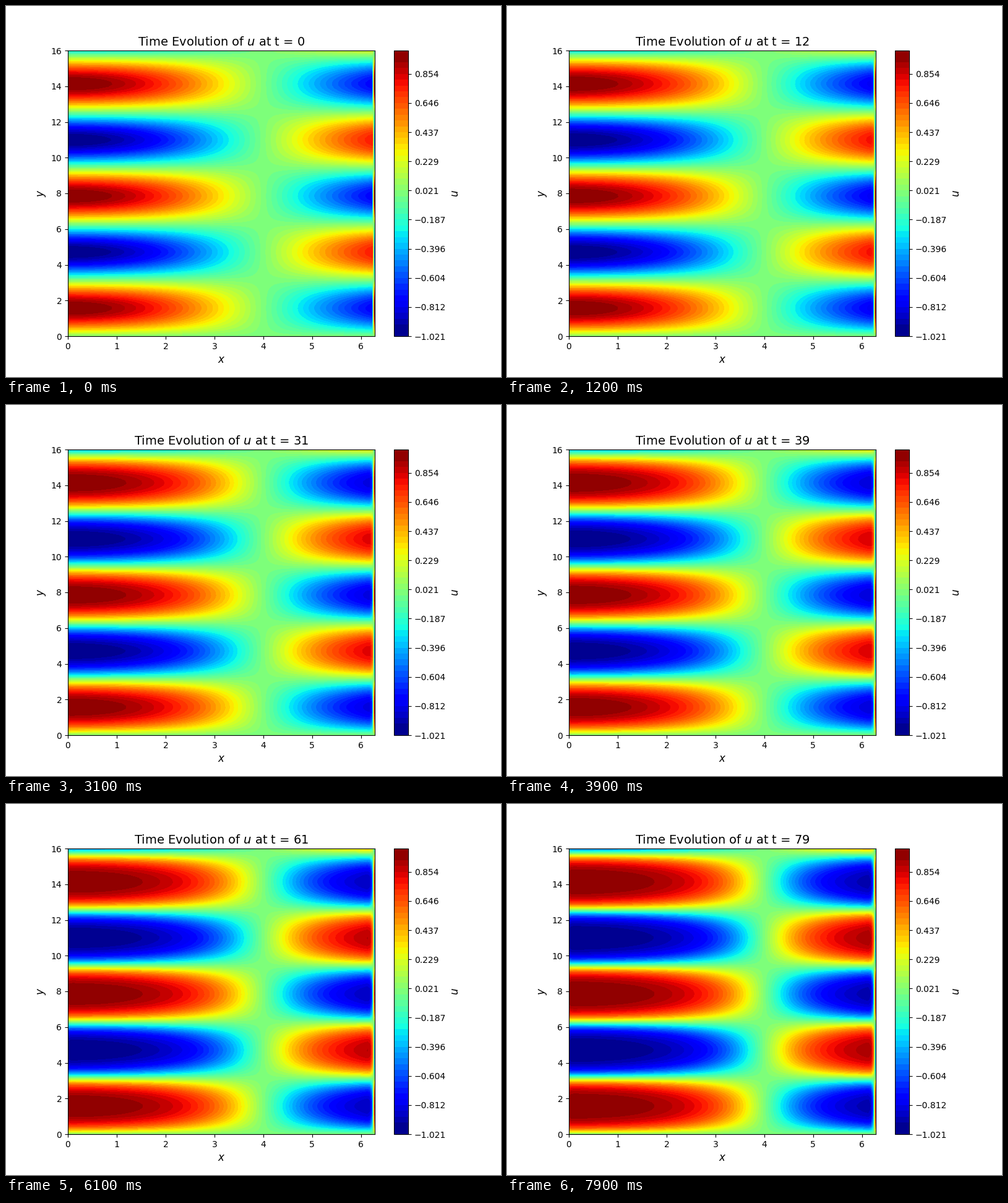
These frames come from a looping animation (800x600 px, 8 s). A matplotlib script:

```python
import numpy as np
import matplotlib.pyplot as plt
from matplotlib.animation import FuncAnimation
from matplotlib.colors import ListedColormap

N = 128
FRAMES = 80
DT = 0.01
DIFF = 0.001

x = np.linspace(0, 2 * np.pi, N)
y = np.linspace(0, 16, N)
dx, dy = x[1] - x[0], y[1] - y[0]
X, Y = np.meshgrid(x, y)


def second_diff(u, axis, h):
    return (np.roll(u, 1, axis) + np.roll(u, -1, axis) - 2 * u) / h**2


def step(u):
    """One explicit Allen-Cahn step on a periodic grid."""
    lap = second_diff(u, 1, dx) + second_diff(u, 0, dy)
    return u + DT * (DIFF * lap + u - u**3)


def solve():
    u = np.cos(np.pi * X / 8) * np.sin(Y)
    u[:, -1] = u[:, 0]
    fields = [u]
    for _ in range(FRAMES - 1):
        fields.append(step(fields[-1]))
    return fields


fields = solve()
levels = np.linspace(-1.0207, 1.0207, 50)

# Jet bands, with the two outermost at each end sharing a tone
bands = plt.get_cmap("jet")(np.linspace(0, 1, len(levels) - 1))
bands[:2] = (0, 0, 0.57, 1)
bands[-2:] = (0.57, 0, 0, 1)
cmap = ListedColormap(bands)

fig, ax = plt.subplots(figsize=(8, 6), dpi=100)


def draw_field(i):
    ax.set_title(f"Time Evolution of $u$ at t = {i}", fontsize=14)
    return ax.contourf(X, Y, fields[i], levels=levels, cmap=cmap)


bar = fig.colorbar(draw_field(0), ax=ax, ticks=levels[::5])
bar.set_label("$u$", fontsize=12)
ax.set_xlabel("$x$", fontsize=12)
ax.set_ylabel("$y$", fontsize=12)


def update(i):
    for old in list(ax.collections):
        old.remove()
    draw_field(i)
    return []


anim = FuncAnimation(fig, update, frames=FRAMES, interval=100,
                     repeat=True, repeat_delay=0, blit=False)
plt.show()
```
